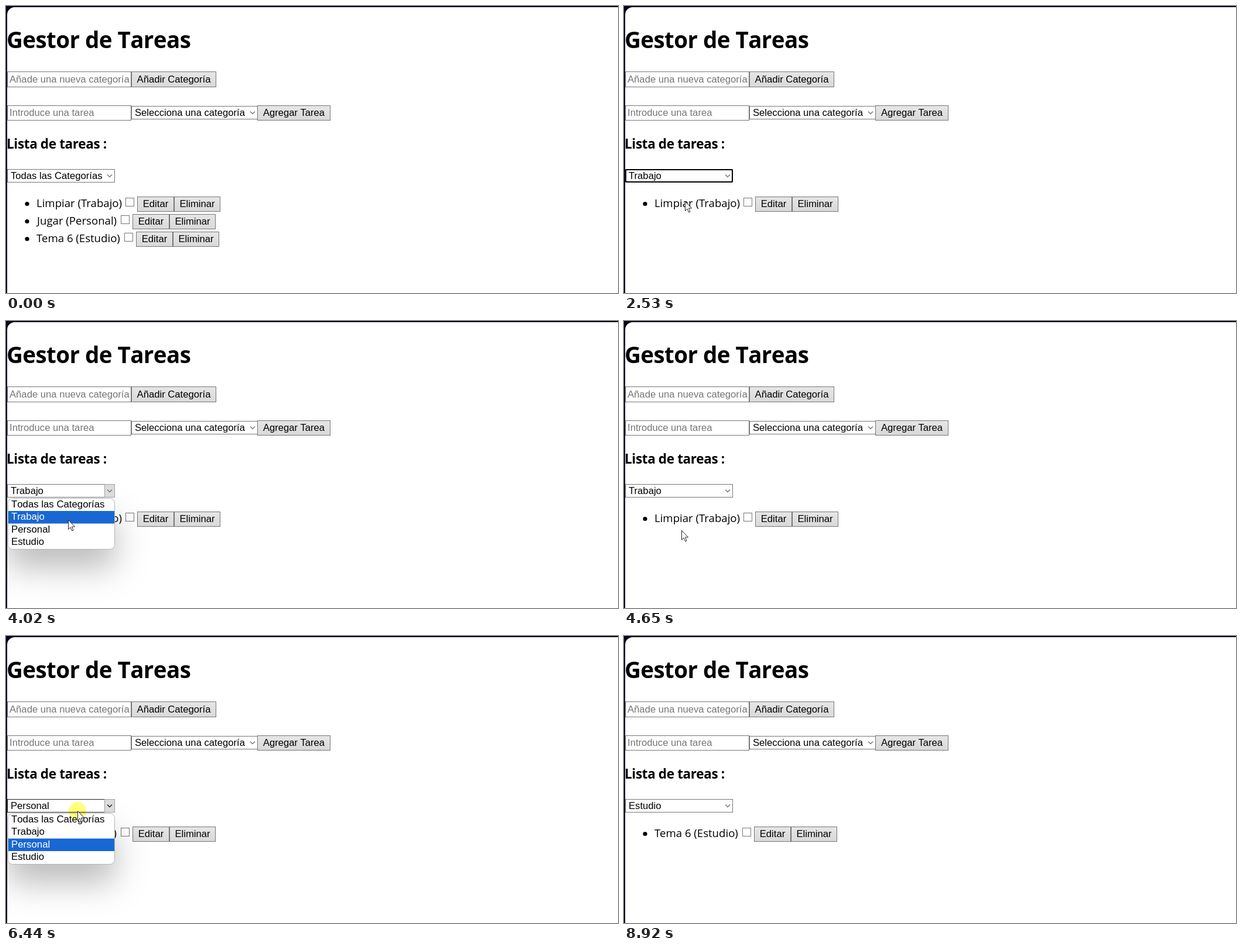
An HTML page for the animation above (9.11 s loop, 1045 by 491 pixels).

```html
<!DOCTYPE html>
<html lang="es">
<head>
<meta charset="utf-8">
<title>Gestor de Tareas</title>
<style>
  html, body { margin: 0; height: 100%; overflow: hidden; background: #050517; }
  svg { display: block; width: 100vw; height: 100vh; font: 16.67px "Liberation Sans", Arial, sans-serif; }
  text { white-space: pre; }
  .title { font: bold 38.5px "Open Sans", "Noto Sans", sans-serif; letter-spacing: -.55px; font-kerning: none; }
  .subtitle { font: bold 22.5px "Open Sans", "Noto Sans", sans-serif; letter-spacing: -.35px; }
  .task { font: 18.6px "Open Sans", "Noto Sans", sans-serif; }
  .hint { fill: #757575; }
  .mid { text-anchor: middle; }
  .chevron { fill: none; stroke: #767676; stroke-width: 1.5; }
  .panel { fill: #fff; stroke: #b4b4b4; filter: drop-shadow(0 32px 27px rgba(0, 0, 0, .26)); }
  #popup text { font-size: 16.8px; font-kerning: none; }
</style>
</head>
<body>
<svg id="stage" viewBox="0 0 1045 491"></svg>
<script>
const LOOP = 9110;
const options = ['Todas las Categorías', 'Trabajo', 'Personal', 'Estudio'];
const tasks = [
  { name: 'Limpiar (Trabajo)', x: 52, end: 224 },
  { name: 'Jugar (Personal)', x: 53, end: 216 },
  { name: 'Tema 6 (Estudio)', x: 52, end: 222 },
];

// Cursor legs: start, end, target x, target y, easing
const out = p => 1 - (1 - p) ** 3;
const both = p => p * p * (3 - 2 * p);
const start = [862, 478];
const legs = [
  [130, 640, 108, 297, out],
  [1330, 1660, 104, 334, out],
  [2530, 3150, 126, 292, both],
  [3620, 4230, 98, 358, both],
  [5010, 5290, 121, 304, both],
  [6100, 6160, 122, 299, both],
  [6630, 7080, 96, 388, both],
  [7900, 8080, 665, 494, p => p ** 1.4],
];
const presses = [[850, 1090], [1920, 2150], [3330, 3620], [4440, 4650], [5600, 5810], [6390, 6630], [7270, 7480]];
const openings = [[870, 2150], [3350, 4650], [6410, 7480]];
const focused = [[2170, 3350], [4670, 5600], [7480, 8920]];
const choices = [2170, 4670, 7480];

const text = (x, y, s, cls = '') => `<text x="${x}" y="${y}" class="${cls}">${s}</text>`;
const box = (x, y, x2, y2, fill = '#fff', id = '') =>
  `<rect id="${id}" x="${x + .5}" y="${y + .5}" width="${x2 - x - 1}" height="${y2 - y - 1}" fill="${fill}" stroke="#767676"/>`;
const button = (x, y, x2, y2, s) =>
  box(x, y, x2, y2, 'url(#face)') + text((x + x2) / 2, Math.round((y + y2) / 2 + 5), s, 'mid');
const chevron = (x, y, id) => `<path id="${id}" class="chevron" d="M${x - 4} ${y - 2}l4 4 4-4"/>`;

const row = ({ name, x, end }) => `<g class="row">
  <circle cx="36" cy="338.5" r="3.6"/>${text(x, 343.5, name, 'task')}
  ${box(end - 20, 328, end - 5, 343)}
  ${button(end, 326, end + 63, 352, 'Editar')}${button(end + 63, 326, end + 142, 352, 'Eliminar')}</g>`;

const stage = document.getElementById('stage');
stage.innerHTML = `
  <defs>
    <linearGradient id="face" x2="0" y2="1"><stop stop-color="#e6e6e6"/><stop offset="1" stop-color="#d9d9d9"/></linearGradient>
    <clipPath id="page"><rect x="2" y="2" width="1100" height="520" rx="13"/></clipPath>
    <clipPath id="list"><rect x="4" y="304" width="181" height="86" rx="7"/></clipPath>
  </defs>
  <rect width="1045" height="491" fill="#050517"/>
  <g clip-path="url(#page)">
    <rect width="1045" height="491" fill="#fff"/>
    ${text(1, 72, 'Gestor de Tareas', 'title')}
    ${box(2, 112, 214, 139)}${text(6, 131, 'Añade una nueva categoría', 'hint')}
    ${button(214, 112, 359, 139, 'Añadir Categoría')}
    ${box(2, 170, 214, 196)}${text(6, 188, 'Introduce una tarea', 'hint')}
    ${box(214, 171, 430, 194)}${text(220, 188, 'Selecciona una categoría')}${chevron(421, 182.5, '')}
    ${button(429, 170, 554, 196, 'Agregar Tarea')}
    ${text(1, 244, 'Lista de tareas :', 'subtitle')}
    ${tasks.map(row).join('')}
    <g id="popup">
      <rect class="panel" x="3.5" y="303.5" width="182" height="87" rx="8"/>
      <g clip-path="url(#list)"><rect id="mark" x="3" width="183" height="21.5" fill="#1967d2"/></g>
      ${options.map((s, i) => text(9, 319 + Math.round(i * 21.4), s, 'option')).join('')}
    </g>
    ${box(2, 279, 186, 302, '#fff', 'frame')}
    <rect id="arrow" x="168.5" y="279.5" width="17" height="22" fill="#dcdcdc" stroke="#a0a0a0"/>
    <text id="value" x="8" y="296"></text>${chevron(177, 290.5, 'tick')}
    <rect id="ring" x="3" y="280" width="182" height="21" rx="2" fill="none" stroke="#000" stroke-width="2"/>
  </g>
  <g id="cursor">
    <circle id="spot" r="15" fill="#ff0" opacity=".5" style="mix-blend-mode: multiply"/>
    <path d="M.5.5V16.5L4 13 6.7 19 9 18 6.5 12H11.5Z" fill="#fff" stroke="#222"/>
  </g>`;

const $ = id => document.getElementById(id);
const show = (el, on) => el.setAttribute('visibility', on ? 'visible' : 'hidden');
const within = (spans, t) => spans.some(([a, b]) => t >= a && t < b);
const rows = stage.querySelectorAll('.row');
const items = stage.querySelectorAll('.option');

function cursorAt(t) {
  let [x, y] = start;
  for (const [a, b, tx, ty, ease] of legs) {
    if (t < a) break;
    const p = ease(Math.min(1, (t - a) / (b - a)));
    x += (tx - x) * p;
    y += (ty - y) * p;
  }
  return [x, y];
}

function draw(t) {
  const [x, y] = cursorAt(t);
  const visible = t >= 130 && t < 8080;
  const pressed = within(presses, t);
  const open = within(openings, t);
  const focus = within(focused, t);
  const hover = visible && x < 186 && y >= 279 && y < 302;
  const dark = hover && !focus && (!open || pressed);
  const choice = choices.filter(c => t >= c).length;

  $('cursor').setAttribute('transform', `translate(${Math.round(x)} ${Math.round(y)})`);
  show($('cursor'), visible);
  show($('spot'), visible && pressed);

  $('value').textContent = options[choice];
  $('frame').setAttribute('stroke', dark ? '#222' : '#767676');
  $('tick').style.stroke = dark ? '#222' : '#767676';
  show($('arrow'), hover || open);
  show($('ring'), focus);

  rows.forEach((el, i) => {
    show(el, !choice || choice === i + 1);
    el.setAttribute('transform', `translate(0 ${choice ? 0 : i * 30})`);
  });

  const active = y < 305 ? choice : Math.min(3, Math.floor((y - 305) / 21.6));
  show($('popup'), open);
  $('mark').setAttribute('y', 303.5 + active * 21.5);
  items.forEach((el, i) => el.setAttribute('fill', i === active ? '#fff' : '#000'));
}

const origin = performance.now();
function tick() {
  draw(Math.max(0, performance.now() - origin) % LOOP);
  requestAnimationFrame(tick);
}
tick();
</script>
</body>
</html>
```
